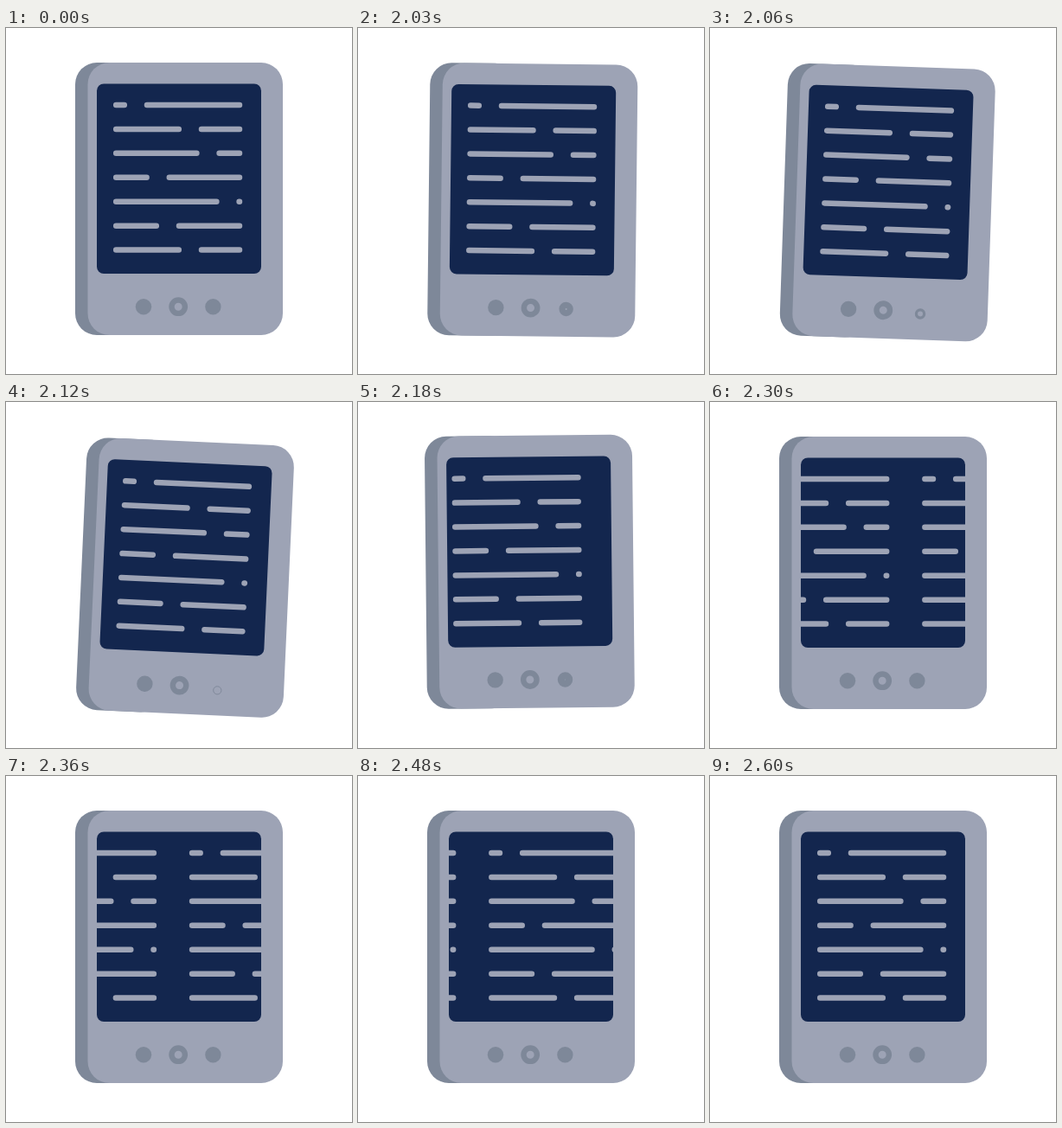
Write an HTML page that moves like this. It is 400 px wide and 400 px high and loops after 2630 ms.

```html
<!DOCTYPE html>
<html lang="en">
<head>
<meta charset="utf-8">
<title>E-reader page turn</title>
<style>
  html, body { margin: 0; width: 100%; height: 100%; overflow: hidden; background: #fff; }
  svg { display: block; width: 100%; height: 100%; }
  .light { fill: #9da3b5; }
  .dark { fill: #7e8899; }
  .navy { fill: #13264e; }
  .ring { fill: none; stroke: #7e8899; }
  .text { fill: none; stroke: #9da3b5; stroke-width: 6.5; stroke-linecap: round; }
</style>
</head>
<body>
<svg viewBox="0 0 400 400">
  <defs>
    <clipPath id="screen"><rect x="105" y="64.5" width="190" height="219.5" rx="8"/></clipPath>
  </defs>
  <g id="device">
    <rect class="dark" x="80" y="40" width="100" height="315" rx="25"/>
    <rect class="light" x="94.5" y="40" width="225.5" height="315" rx="25"/>
    <rect class="navy" x="105" y="64.5" width="190" height="219.5" rx="8"/>
    <g clip-path="url(#screen)">
      <path id="oldPage" class="text"/>
      <path id="newPage" class="text"/>
    </g>
    <circle class="dark" cx="159" cy="322.2" r="9.2"/>
    <circle class="ring" cx="199.2" cy="322.2" r="7.7" stroke-width="6.4"/>
    <circle id="button" class="ring" cx="239.4" cy="322.2" r="4.6"/>
  </g>
</svg>
<script>
const LOOP = 2630, HOLD = 2030, STEP = 30;
const PAGE_WIDTH = 187;
const [device, oldPage, newPage, button] =
  ["device", "oldPage", "newPage", "button"].map(id => document.getElementById(id));

// Each row is two strokes around a gap; the values are where the first one ends.
const rowEnds = [136.8, 199.8, 220.4, 162.6, 243.4, 173.8, 199.8];
const pagePath = rowEnds.map((end, i) => {
  const y = 89 + i * 27.93;
  return `M127.2 ${y}H${end}M${Math.min(end + 26.2, 269.8)} ${y}H270`;
}).join("");
oldPage.setAttribute("d", pagePath);
newPage.setAttribute("d", pagePath);

const smooth = u => u * u * (3 - 2 * u);

// Eased value at time t through [time, value] keys.
function track(t, keys) {
  if (t <= keys[0][0]) return keys[0][1];
  for (let i = 1; i < keys.length; i++) {
    const [t0, a] = keys[i - 1], [t1, b] = keys[i];
    if (t <= t1) return a + (b - a) * smooth((t - t0) / (t1 - t0));
  }
  return keys[keys.length - 1][1];
}

const tiltKeys = [[2000, 0], [2100, 3], [2200, -1], [2300, 0]];
const pressKeys = [[2000, 0], [2100, 1], [2200, 0]];
const scrollKeys = [[2100, 0], [2600, PAGE_WIDTH]];

function draw(time) {
  const t = time < HOLD ? 0 : HOLD + Math.floor((time - HOLD) / STEP) * STEP;
  const press = track(t, pressKeys);
  const scroll = track(t, scrollKeys);
  device.setAttribute("transform", `rotate(${track(t, tiltKeys)} 80 355)`);
  oldPage.setAttribute("transform", `translate(${-scroll})`);
  newPage.setAttribute("transform", `translate(${PAGE_WIDTH - scroll})`);
  button.setAttribute("stroke-width", 9.2 * (1 - press));
  button.setAttribute("transform", `translate(${4.2 * press} ${4.2 * press})`);
}

const start = performance.now();
function tick() {
  draw((performance.now() - start) % LOOP);
  requestAnimationFrame(tick);
}
draw(0);
requestAnimationFrame(tick);
</script>
</body>
</html>
```
